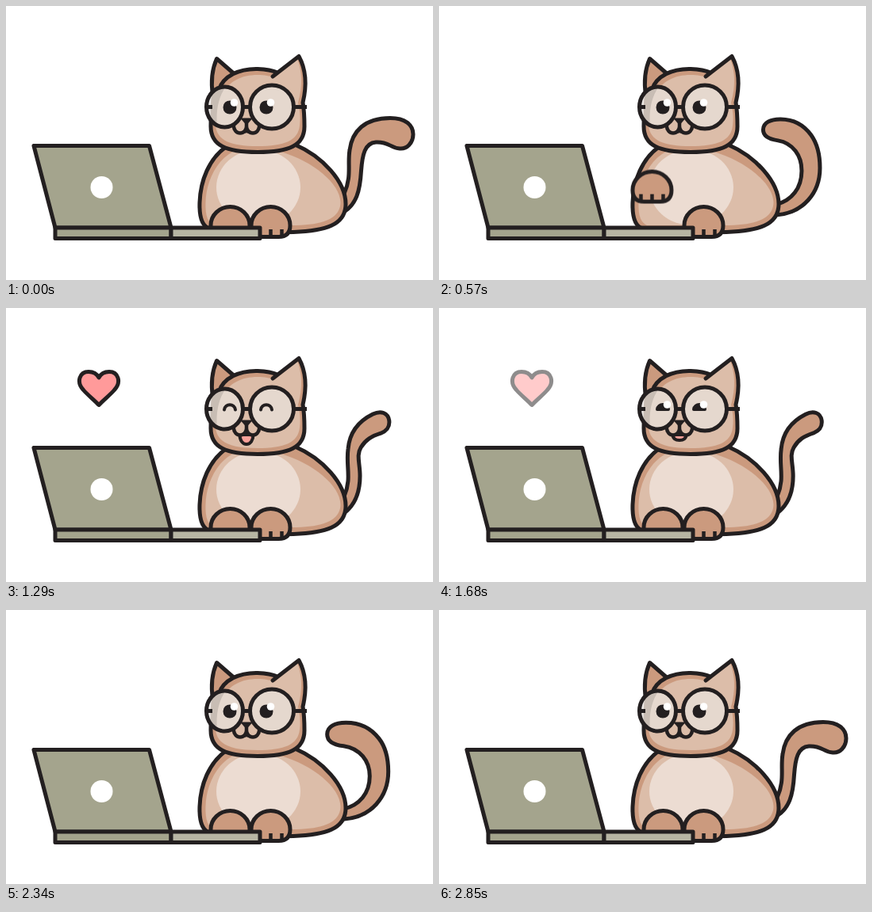
An HTML page that plays this animation: 538x346 px, repeating every 3.6 s.

```html
<!DOCTYPE html>
<html lang="en">
<head>
<meta charset="utf-8">
<title>Cat at a laptop</title>
<style>
html, body { margin: 0; width: 100%; height: 100%; overflow: hidden; background: #fff; }
svg { display: block; width: 538px; height: 346px; }
:root { --ink: #231f20; --dark: #cb9a7e; --mid: #dcbda9; --pale: #ecdcd2; --glass: #e5d8ce; }
.line { stroke: var(--ink); stroke-width: 5; stroke-linejoin: round; stroke-linecap: round; fill: none; }
.dark { fill: var(--dark); }
.mid { fill: var(--mid); }
.pale { fill: var(--pale); }
.glass { fill: var(--glass); }

.tail, .paw, .eye, .glint, .mouth, .heart { animation: 3600ms linear infinite both; }

/* Tail: right, halfway up, curled left */
.tail { animation-name: tail; }
@keyframes tail {
  0%, 3.333%, 41.25%, 79.167%, 100% {
    d: path("M426 237C436 215 430 200 433 182C436 158 452 141.500 484 141.500C503 141.500 513 150 513 162C513 173 505 181 496 180C484 179 482 171 466 172C452 173 449 188 447.500 208C446 235 441 250 426 260");
    animation-timing-function: cubic-bezier(.4, 0, .7, .47);
  }
  8.75%, 46.667% {
    d: path("M426 238C436 215 428 200 431 178C433 155 446 142 462 134C472 129 481 132 482.500 142C483.500 151 479 155 472 158C460 162 453 166 447 176C441 186 446 196 446 212C446 236 438 250 426 259");
    animation-timing-function: cubic-bezier(.3, .45, .5, 1);
  }
  18.333%, 26.25%, 56.25%, 64.167% {
    d: path("M426 251C445 247 458.500 232 458.500 210C458.500 191 446 175 425 172C412 170.500 404 166 404 157C404 147 414 142 428 142C446 142 460 149 470 162C478 172 482 188 482 204C482 236 460 262 426 264");
    animation-timing-function: cubic-bezier(.45, 0, .7, .62);
  }
  35.833%, 73.75% {
    d: path("M426 238C436 215 428 200 431 178C433 155 446 142 462 134C472 129 481 132 482.500 142C483.500 151 479 155 472 158C460 162 453 166 447 176C441 186 446 196 446 212C446 236 438 250 426 259");
    animation-timing-function: cubic-bezier(.3, .53, .6, 1);
  }
}

/* Paw lifts, taps the keys, slides back */
.paw { animation-name: paw; }
@keyframes paw {
  0%, 3.333% { transform: none; animation-timing-function: ease-in-out; }
  13.333% { transform: translate(-10px, -52px); animation-timing-function: ease-in; }
  15.833% { transform: translate(-14px, -45px); }
  18.333%, 23.333% { transform: translate(-22px, 0); animation-timing-function: ease-in; }
  26.667% { transform: translate(-19.500px, 0); animation-timing-function: ease-out; }
  34.167%, 100% { transform: none; }
}

.eye { stroke-width: 4; fill: var(--ink); animation-name: eye; }
@keyframes eye {
  0%, 24.167%, 49.167%, 100% { d: path("M-6.500 0C-6.500 -8.700 6.500 -8.700 6.500 0C6.500 8.700 -6.500 8.700 -6.500 0Z"); }
  26.667%, 46.667% { d: path("M-7 0C-6 -8 6 -8 7 0C3 0 -3 0 -7 0Z"); }
  29.167%, 44.167% { d: path("M-7 .5C-6 -8 6 -8 7 .5C6 -8 -6 -8 -7 .5Z"); }
}
.glint { fill: #fff; animation-name: glint; }
@keyframes glint {
  0%, 26.667%, 46.667%, 100% { r: 4.8px; }
  29.167%, 44.167% { r: 0px; }
}

.mouth { fill: #f9a19a; stroke-width: 4; animation-name: mouth; }
@keyframes mouth {
  0%, 24.167%, 49.167%, 100% { d: path("M297 158C297 159 300 159 303 158C306 159 309 159 309 158Z"); }
  26.667% { d: path("M294 160C294 164 298 165 303 165C308 165 311 164 311 160Z"); }
  29.167%, 44.167% { d: path("M294.500 160C294.500 167 298 172 303 172C308 172 311.500 167 311.500 160Z"); }
  46.667% { d: path("M294.500 160C294.500 165 298 167 303 167C308 167 311.500 165 311.500 160Z"); }
}

.heart { fill: #ff9a9a; animation-name: heart; }
@keyframes heart {
  0%, 18.333% { opacity: 0; transform: translate(117px, 175px) scale(.5); }
  26.667% { opacity: .9; transform: translate(117px, 125px) scale(.89); animation-timing-function: ease-out; }
  30.833% { opacity: 1; transform: translate(117px, 93px); animation-timing-function: ease-in-out; }
  33.333%, 44.167% { opacity: 1; transform: translate(117px, 101px); }
  49.333%, 100% { opacity: 0; transform: translate(117px, 101px); }
}
</style>
</head>
<body>
<svg viewBox="0 0 538 346">
  <defs>
    <clipPath id="lens"><ellipse cx="275.500" cy="127.500" rx="23" ry="25.500"/></clipPath>
    <g id="foot">
      <path class="line dark" d="M-24.500 277A24.500 23.500 0 0 1 24.500 277C24.500 287 19 291.500 10 291.500H-10C-19 291.500-24.500 287-24.500 277Z"/>
      <path class="line" style="stroke-width:4.500;stroke-linecap:butt" d="M-14 282v9M0 282v9M14 282v9"/>
    </g>
    <path id="torso" d="M277 178C256 193 245 220 244 248C243.500 262 245 277 256 281C290 285 330 286.500 362 285.500C402 284 428 277 428 250C428 222 399 190 364 175Z"/>
  </defs>

  <path class="line dark tail"/>

  <!-- body -->
  <use href="#torso" class="dark"/>
  <path class="mid" d="M286 184C265 195 252 222 251.500 248C251 262 253 273 262 277H360C396 277 421 270 421.500 248C421 224 387 196 346 184Z"/>
  <ellipse class="pale" cx="318" cy="229" rx="53" ry="48"/>
  <use href="#torso" class="line"/>

  <!-- head -->
  <path class="line dark" d="M260.500 112C257.500 92 260 79 265.500 66.500L289 87L268 112Z"/>
  <path class="dark" d="M268 106C274 88 294 79 317 79.500C328 80 336 82 343 85L369 63.500C378 80 379 101 374 122C376 134 376 142 376 152C376 176 357 184.500 317 184.500C277 184.500 258 176 258 152C258 135 259 122 268 106Z"/>
  <path class="mid" d="M273 112C280 95 297 87 317 87C326 87 332 88 338 91L367 67C373 82 374 101 368 122C371 136 371 143 370 151C368 170 351 177 317 177C283 177 266 170 264 151C263 135 266 122 273 112Z"/>
  <path class="line" d="M336 89L369 63.500C378 80 379 101 374 122C376 134 376 142 376 152C376 176 357 184.500 317 184.500C277 184.500 258 176 258 152C258 135 259 122 268 106C274 88 294 79 317 79.500C327 80 335 81 342 84"/>

  <!-- mouth and nose -->
  <path class="line mouth"/>
  <path class="line mid" style="stroke-width:4.500" d="M287 152A8 8.500 0 0 0 303 152V147V152A8 8.500 0 0 0 319 152"/>
  <path d="M295 141.500H311L303 150.500Z" fill="#231f20"/>

  <!-- glasses and eyes -->
  <ellipse class="glass" cx="275.500" cy="127.500" rx="23" ry="25.500"/>
  <g clip-path="url(#lens)">
    <path fill="#eeeae7" d="M245 98H264C259 115 257 130 258 155H245Z"/>
    <path fill="#c8bdb4" d="M261 98H280C268 112 264 130 266 155H258C257 130 258 115 261 98Z"/>
  </g>
  <circle class="glass" cx="335" cy="127.500" r="27.500"/>
  <g transform="translate(282 128)"><path class="line eye"/><circle class="glint" cx="5.500" cy="-6"/></g>
  <g transform="translate(328 128)"><path class="line eye"/><circle class="glint" cx="5.500" cy="-6"/></g>
  <g class="line" style="stroke-linecap:butt">
    <ellipse cx="275.500" cy="127.500" rx="23" ry="25.500"/>
    <circle cx="335" cy="127.500" r="27.500"/>
    <path d="M298 127.500H308M251 127.500H260M363 127.500H379"/>
  </g>

  <g class="paw"><use href="#foot" x="282.500"/></g>
  <use href="#foot" x="333.500"/>

  <path class="line heart" d="M0 21.500C-6 15-14 9-19.500 2.500C-29-8-24-20.500-13-20.500C-6-20.500-2-17 0-13C2-17 6-20.500 13-20.500C24-20.500 29-8 19.500 2.500C14 9 6 15 0 21.500Z"/>

  <!-- laptop -->
  <g class="line">
    <path fill="#a4a48d" d="M35 176.500H180.500L208 280H62Z"/>
    <circle cx="120.500" cy="229" r="14" fill="#fff" stroke="none"/>
    <path fill="#a4a48d" d="M62 280H208V293.500H62Z"/>
    <path fill="#b7b5a3" d="M208 280H320V293.500H208Z"/>
  </g>
</svg>
</body>
</html>
```
